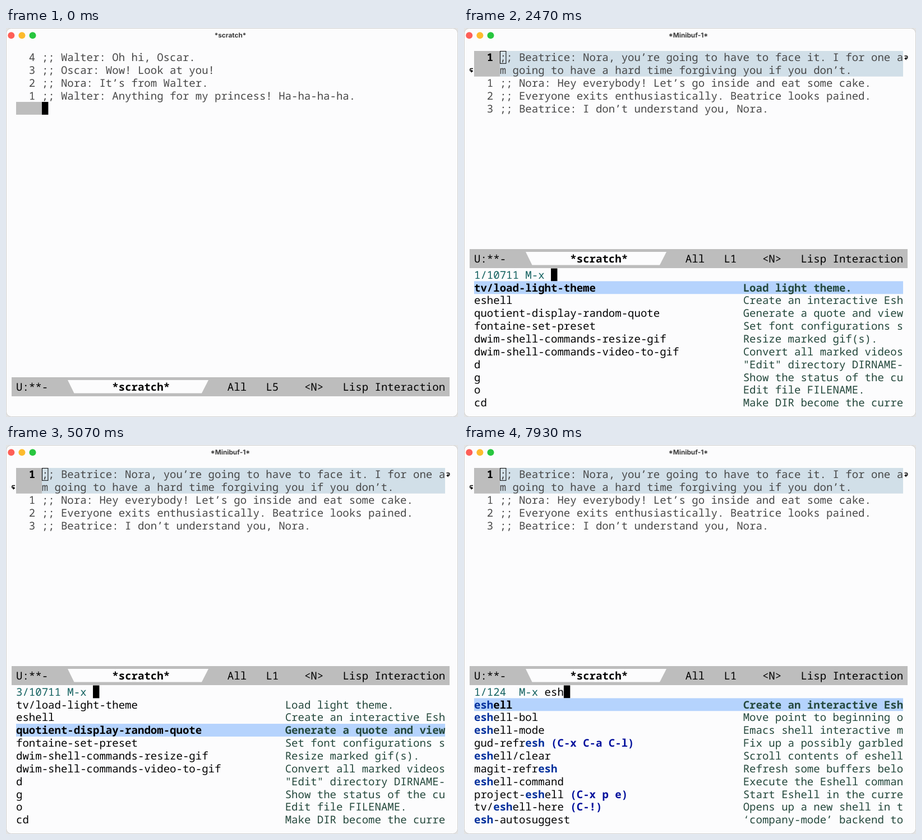
Animation of 806x695 px, one loop 8000 ms. Source, as an HTML page:

```html
<!DOCTYPE html>
<html lang="en">
<head>
<meta charset="utf-8">
<title>*scratch*</title>
<style>
html, body { margin: 0; width: 100%; height: 100%; overflow: hidden; background: #e4e4e4; }
svg { display: block; width: 806px; height: 695px; }
text {
  font: 19.04px "Noto Sans Mono", "DejaVu Sans Mono", monospace;
  font-variant-ligatures: none;
  white-space: pre;
  text-rendering: geometricPrecision;
}
.b { font-weight: 700; }
.title { font: 700 11.8px Inter, "Open Sans", sans-serif; fill: #3a3a3a; }
</style>
</head>
<body>
<svg id="stage" viewBox="0 0 806 695"></svg>
<script>
const LOOP = 8000, CW = 11.42, LH = 22.86, LEFT = 18, TOP = 41, MINI = 429.5;
const stage = document.getElementById('stage');

const INK = '#000', COMMENT = '#484848', GREY = '#bdbdbd', PROMPT = '#12605f',
      NOTE = '#24483c', MATCH = '#002f9c', KEYS = '#000f9c', SELECTED = '#b5d3fd', CURRENT = '#d1dfe8';

const firstScene = [
  'Walter: Oh hi, Oscar.',
  'Oscar: Wow! Look at you!',
  'Nora: It’s from Walter.',
  'Walter: Anything for my princess! Ha-ha-ha-ha.'
];
const secondScene = [
  ';; Beatrice: Nora, you’re going to have to face it. I for one a',
  'm going to have a hard time forgiving you if you don’t.',
  ';; Nora: Hey everybody! Let’s go inside and eat some cake.',
  ';; Everyone exits enthusiastically. Beatrice looks pained.',
  ';; Beatrice: I don’t understand you, Nora.'
];

const themeCmd = ['tv/load-light-theme', 'Load light theme.'];
const shellCmd = ['eshell', 'Create an interactive Esh'];
const quoteCmd = ['quotient-display-random-quote', 'Generate a quote and view'];
const middle = [
  ['fontaine-set-preset', 'Set font configurations s'],
  ['dwim-shell-commands-resize-gif', 'Resize marked gif(s).'],
  ['dwim-shell-commands-video-to-gif', 'Convert all marked videos']
];
const rest = [
  ['d', '"Edit" directory DIRNAME-'],
  ['g', 'Show the status of the cu'],
  ['o', 'Edit file FILENAME.'],
  ['cd', 'Make DIR become the curre']
];
const before = [themeCmd, shellCmd, quoteCmd, ...middle, ...rest];
const after = [quoteCmd, shellCmd, ...middle, themeCmd, ...rest];
const filtered = [
  shellCmd,
  ['eshell-bol', 'Move point to beginning o'],
  ['eshell-mode', 'Emacs shell interactive m'],
  ['gud-refresh (C-x C-a C-l)', 'Fix up a possibly garbled'],
  ['eshell/clear', 'Scroll contents of eshell'],
  ['magit-refresh', 'Refresh some buffers belo'],
  ['eshell-command', 'Execute the Eshell comman'],
  ['project-eshell (C-x p e)', 'Start Eshell in the curre'],
  ['tv/eshell-here (C-!)', 'Opens up a new shell in t'],
  ['esh-autosuggest', '‘company-mode’ backend to']
];

// Hard cuts: each state holds until the next one starts.
const states = [
  { at: 0, first: true },
  { at: 870, echo: 'C-c ä' },
  { at: 2200, list: before, sel: 0 },
  { at: 4400, list: before, sel: 1 },
  { at: 4730, list: before, sel: 2 },
  { at: 5400 },
  { at: 6600, list: after, sel: 0 },
  { at: 7330, list: after, sel: 0, input: 'e' },
  { at: 7530, list: after, sel: 0, input: 'es' },
  { at: 7730, list: filtered, sel: 0, input: 'esh', total: 124 }
];

const esc = s => s.replace(/&/g, '&amp;').replace(/</g, '&lt;');
const colX = c => LEFT + c * CW;
const rect = (x, y, w, h, fill, extra = '') =>
  `<rect x="${x}" y="${y}" width="${w}" height="${h}" fill="${fill}" ${extra}/>`;
const raw = (col, top, body, fill, bold) =>
  `<text x="${colX(col)}" y="${top + 18.2}" fill="${fill}"${bold ? ' class="b"' : ''}>${body}</text>`;
const text = (col, top, s, fill = INK, bold = false) => raw(col, top, esc(s), fill, bold);

function windowFrame(title) {
  const lights = ['#fe5f57', '#fdbb2e', '#28c63f']
    .map((c, i) => `<circle cx="${9.3 + 19.1 * i}" cy="13.2" r="6" fill="${c}"/>`).join('');
  return rect(0.5, 0.5, 805, 694, '#fcfcfd', 'rx="9" stroke="#cfcfcf"') + lights +
    `<text class="title" x="400" y="17" text-anchor="middle">${title}</text>`;
}

function modeLine(y, line) {
  const t = y + 5.5;
  return rect(10, y, 781, 34, GREY) +
    `<path d="M110 ${y + 5}H361L349 ${y + 28.5}H121.5Z" fill="#fcfcfd"/>` +
    text(0, t, 'U:**-') + text(15, t, '*scratch*', INK, true) + text(33, t, 'All') +
    text(39, t, 'L' + line) + text(45, t, '<N>') + text(51, t, 'Lisp Interaction');
}

function firstBuffer() {
  const rows = firstScene.map((s, i) => text(2, TOP + i * LH, `${4 - i} ;; ${s}`, COMMENT)).join('');
  const y = TOP + 4 * LH - 0.4;
  return rows + rect(18, y, 46, LH, GREY) + rect(64, y, 11.4, LH, INK);
}

function wrapMark(x, y, flip) {
  return `<g transform="translate(${x} ${y}) scale(${flip ? -1 : 1} 1)">` +
    '<path d="M-2.5 -2.5H1Q2.7 -2.5 2.7 -.5V.5Q2.7 2 1 2H0" fill="none" stroke="#000" stroke-width="1.5"/>' +
    '<path d="M-2.8 2L.8 -1V5Z"/></g>';
}

function secondBuffer(active) {
  let out = rect(18, TOP, 46, 2 * LH, GREY) + rect(64, TOP, 719, 2 * LH, CURRENT) +
    text(2, TOP, '1', INK, true);
  secondScene.forEach((s, i) => {
    const y = TOP + i * LH;
    if (i > 1) out += text(2, y, String(i - 1), COMMENT);
    out += text(4, y, s, COMMENT);
  });
  out += active
    ? rect(64, TOP, 11.4, LH, INK) + text(4, TOP, ';', '#fff')
    : rect(64.5, TOP + 0.5, 10.4, LH - 1, 'none', 'stroke="#000"');
  return out + wrapMark(788, 52.5, false) + wrapMark(13.5, 75, true);
}

// Colours the typed letters and the key bindings in a candidate.
function candidate(name, query) {
  if (!query) return esc(name);
  return name.split(/(esh|\(.*\))/).map(part => {
    const fill = part === query ? MATCH : part[0] === '(' ? KEYS : '';
    return fill ? `<tspan class="b" fill="${fill}">${part}</tspan>` : esc(part);
  }).join('');
}

function minibuffer({ list, sel, input = '', total = 10711 }) {
  const prompt = `${sel + 1}/${total}`.padEnd(6) + ' M-x ';
  const end = prompt.length + input.length;
  let out = text(0, MINI, prompt, PROMPT) + text(prompt.length, MINI, input) +
    rect(colX(end), MINI, 11.4, LH, INK);
  list.forEach(([name, note], i) => {
    const y = MINI + (i + 1) * LH, on = i === sel;
    if (on) out += rect(18, y, 765, LH, SELECTED);
    out += raw(0, y, candidate(name, total === 124 ? input : ''), INK, on) +
      text(42, y, note, NOTE, on);
  });
  return out;
}

function draw(s) {
  const open = !!s.list;
  stage.innerHTML = windowFrame(open ? '*Minibuf-1*' : '*scratch*') +
    (s.first ? firstBuffer() : secondBuffer(!open)) +
    modeLine(open ? 395 : 624, s.first ? 5 : 1) +
    (open ? minibuffer(s) : s.echo ? text(0, 658.2, s.echo) : '');
}

let shown = null;
function tick() {
  const t = performance.now() % LOOP;
  const now = states.filter(s => s.at <= t).pop();
  if (now !== shown) draw(shown = now);
  requestAnimationFrame(tick);
}
tick();
</script>
</body>
</html>
```
